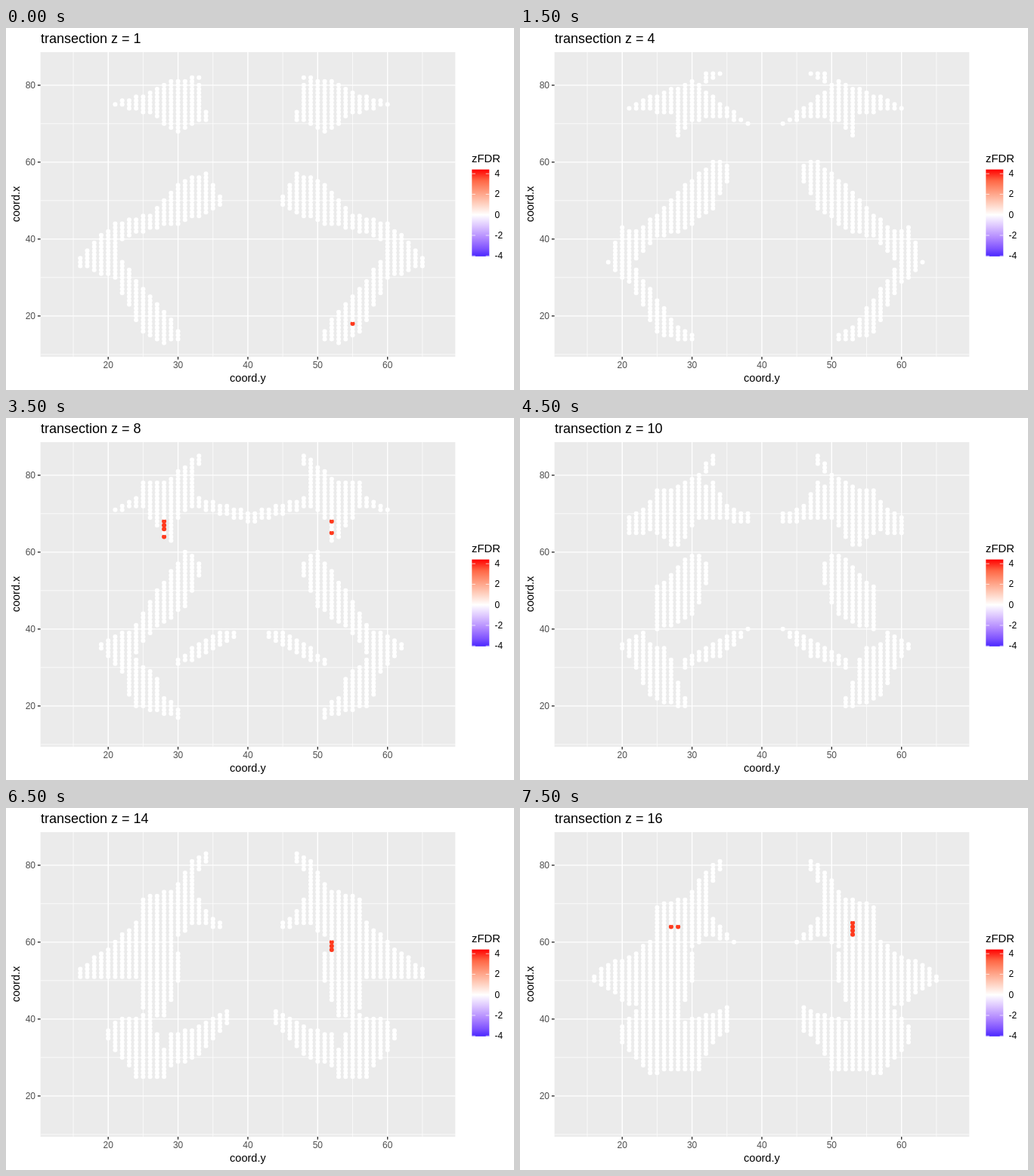
An HTML page with a canvas for the animation above (8 s loop, 672 px wide and 480 px high).

```html
<!DOCTYPE html>
<html lang="en">
<head>
<meta charset="utf-8">
<title>Transections</title>
<style>
html, body { margin: 0; width: 100%; height: 100%; overflow: hidden; background: #fff; }
canvas, svg { position: absolute; left: 0; top: 0; width: 672px; height: 480px; }
text { font-family: "Liberation Sans", Arial, sans-serif; white-space: pre; }
</style>
</head>
<body>
<canvas id="plot" width="672" height="480"></canvas>
<svg id="labels" width="672" height="480"></svg>
<script>
const STEP = 500, COUNT = 16;
const PANEL = { x: 45.6, y: 32, w: 548.7, h: 403.9 };
const MIRROR = 81; // column c has its twin at MIRROR - c
const px = c => PANEL.x + (c - 10.3) * PANEL.w / 59.4;
const py = r => PANEL.y + (88.6 - r) * PANEL.h / 79.2;

// Left half of the slice at a few depths. An outline is a few knots of
// (column, lowest row, highest row); all other slices are blends.
const slices = [
  { z: 1,
    top: [21,75,75, 26,73,78, 28,70,80, 30,68,81, 33,71,80, 34,71,73],
    horn: [32,80,82, 33,82,82],
    mid: [22,40,44, 26,43,46, 30,44,54, 34,47,57, 36,49,51],
    low: [16,33,35, 18,32,39, 21,30,44, 22,26,34, 25,16,27, 28,13,21, 30,14,16] },
  { z: 4,
    top: [21,74,74, 27,73,79, 28,67,79, 30,71,81, 34,72,75, 38,70,70],
    horn: [32,81,83, 34,83,83],
    mid: [22,35,42, 25,41,46, 28,42,52, 33,48,60, 35,55,59],
    low: [18,34,34, 20,30,43, 21,29,42, 22,26,32, 25,16,24, 28,14,17, 30,14,15] },
  { z: 8,
    top: [21,71,71, 24,72,74, 25,72,78, 28,64,78, 29,63,79, 30,69,81, 32,72,83, 33,72,74, 40,68,70],
    horn: [32,81,84, 33,83,85],
    mid: [24,34,41, 26,39,47, 28,42,52, 31,46,60, 33,54,57],
    low: [19,35,36, 22,29,39, 23,23,39, 24,20,32, 27,19,27, 28,18,22, 30,17,19],
    arc: [30,31,32, 33,33,36, 36,36,39, 38,38,39] },
  { z: 12,
    top: [21,58,66, 25,60,74, 28,60,75, 30,66,78, 32,68,83, 33,68,73, 36,67,69],
    horn: [31,80,82, 33,82,84],
    wing: [15,52,54, 17,54,57, 21,57,63],
    mid: [25,46,60, 27,41,60, 29,44,60, 30,50,57],
    low: [20,35,36, 22,30,38, 24,24,39, 26,23,42, 27,23,32, 28,22,24],
    arc: [28,29,32, 31,32,34, 34,32,37, 35,35,38, 38,41,41] },
  { z: 16,
    top: [22,44,57, 24,42,60, 25,57,69, 29,57,71, 32,62,78, 33,62,66, 36,60,60],
    horn: [33,76,80, 34,79,81],
    wing: [16,50,51, 18,48,54, 21,44,56],
    mid: [25,40,58, 28,40,58, 30,50,57],
    low: [20,34,38, 22,30,42, 24,26,41, 28,27,40],
    arc: [29,27,39, 31,27,40, 33,34,41, 35,37,43] }
];

// Significant points per depth: column, lowest row, highest row
const hot = {
  1: [[55, 18, 18]],
  8: [[28, 64, 64], [28, 66, 68], [52, 65, 65], [52, 68, 68]],
  14: [[52, 58, 60]],
  16: [[27, 64, 64], [28, 64, 64], [53, 62, 65]]
};

const mix = (a, b, k) => a + (b - a) * k;
const first = s => s[0];
const last = s => s[s.length - 3];

// Row limits of an outline at a relative position u along its columns
function span(s, u) {
  const c = mix(first(s), last(s), u);
  let i = 0;
  while (i + 6 < s.length && s[i + 3] < c) i += 3;
  const k = (c - s[i]) / (s[i + 3] - s[i]);
  return [mix(s[i + 1], s[i + 4], k), mix(s[i + 2], s[i + 5], k)];
}

function addShape(cells, a, b, k) {
  const c0 = Math.round(mix(first(a), first(b), k));
  const c1 = Math.round(mix(last(a), last(b), k));
  for (let c = c0; c <= c1; c++) {
    const u = (c - c0) / (c1 - c0);
    const p = span(a, u), q = span(b, u);
    const hi = Math.round(mix(p[1], q[1], k));
    for (let r = Math.round(mix(p[0], q[0], k)); r <= hi; r++) {
      cells.set(c * 100 + r, "#fff");
      cells.set((MIRROR - c) * 100 + r, "#fff");
    }
  }
}

function buildCells(z) {
  let i = 0;
  while (i < slices.length - 2 && slices[i + 1].z <= z) i++;
  const a = slices[i], b = slices[i + 1];
  const k = (z - a.z) / (b.z - a.z);
  const cells = new Map();
  for (const name of ["top", "horn", "wing", "mid", "low", "arc"]) {
    const from = a[name] || (k > 0.5 && b[name]);
    if (from) addShape(cells, from, b[name], k);
  }
  for (const [c, lo, hi] of hot[z] || []) {
    for (let r = lo; r <= hi; r++) cells.set(c * 100 + r, "#ff3a1e");
  }
  return [...cells].sort((p, q) => p[0] - q[0]);
}

const ctx = document.getElementById("plot").getContext("2d");

function line(x0, y0, x1, y1, width, color) {
  ctx.strokeStyle = color;
  ctx.lineWidth = width;
  ctx.beginPath();
  ctx.moveTo(x0, y0);
  ctx.lineTo(x1, y1);
  ctx.stroke();
}

function drawPanel() {
  const { x, y, w, h } = PANEL, right = x + w, bottom = y + h;
  ctx.fillStyle = "#ebebeb";
  ctx.fillRect(x, y, w, h);
  for (let c = 15; c <= 65; c += 10) line(px(c), y, px(c), bottom, 0.71, "#fff");
  for (let r = 10; r <= 70; r += 20) line(x, py(r), right, py(r), 0.71, "#fff");
  for (let c = 20; c <= 60; c += 10) {
    line(px(c), y, px(c), bottom, 1.42, "#fff");
    line(px(c), bottom, px(c), bottom + 3.7, 1.42, "#333");
  }
  for (let r = 20; r <= 80; r += 20) {
    line(x, py(r), right, py(r), 1.42, "#fff");
    line(x - 3.7, py(r), x, py(r), 1.42, "#333");
  }
}

const BAR = { x: 616.3, y: 187.6, w: 23, h: 115.2 };
const barY = v => 247.7 - v * 13.63;

function drawBar() {
  const g = ctx.createLinearGradient(0, barY(4.41), 0, barY(-4.41));
  ["#ff0000", "#ff6846", "#ff9e81", "#ffcfbe", "#ffffff", "#dcc5ff", "#b38bff", "#7e52ff", "#0000ff"]
    .forEach((color, i) => g.addColorStop(i / 8, color));
  g.addColorStop(0.96, "#4724ff");
  ctx.fillStyle = g;
  ctx.fillRect(BAR.x, BAR.y, BAR.w, BAR.h);
  for (let v = -4; v <= 4; v += 2) {
    line(BAR.x, barY(v), BAR.x + 4.6, barY(v), 0.7, "#fff");
    line(BAR.x + BAR.w - 4.6, barY(v), BAR.x + BAR.w, barY(v), 0.7, "#fff");
  }
}

const labels = document.getElementById("labels");

function label(str, x, y, size, color = "#000", anchor = "start") {
  const el = document.createElementNS(labels.namespaceURI, "text");
  const attrs = { x, y, "font-size": size, fill: color, "text-anchor": anchor };
  for (const name in attrs) el.setAttribute(name, attrs[name]);
  el.textContent = str;
  labels.append(el);
  return el;
}

const title = label("", 46, 20, 18);
for (let c = 20; c <= 60; c += 10) label(c, px(c), 451, 12, "#4d4d4d", "middle");
for (let r = 20; r <= 80; r += 20) label(r, 39, Math.round(py(r) + 4), 12, "#4d4d4d", "end");
label("coord.y", 319.9, 469, 14.5, "#000", "middle");
label("coord.x", 18, 233.5, 14.5, "#000", "middle").setAttribute("transform", "rotate(-90 18 233.5)");
label("zFDR", 616, 178, 14.9);
for (let v = -4; v <= 4; v += 2) label(v, 646.5, Math.round(barY(v) + 4), 12);

function draw(z) {
  ctx.fillStyle = "#fff";
  ctx.fillRect(0, 0, 672, 480);
  drawPanel();
  drawBar();
  for (const [key, color] of buildCells(z)) {
    ctx.fillStyle = color;
    ctx.beginPath();
    ctx.arc(px(Math.floor(key / 100)), py(key % 100), 3, 0, Math.PI * 2);
    ctx.fill();
  }
  title.textContent = "transection z = " + z;
}

const start = performance.now();
let shown = 0;

function tick() {
  const t = Math.max(0, performance.now() - start) % (STEP * COUNT);
  const z = 1 + Math.floor(t / STEP);
  if (z !== shown) draw(shown = z);
  requestAnimationFrame(tick);
}
tick();
</script>
</body>
</html>
```
